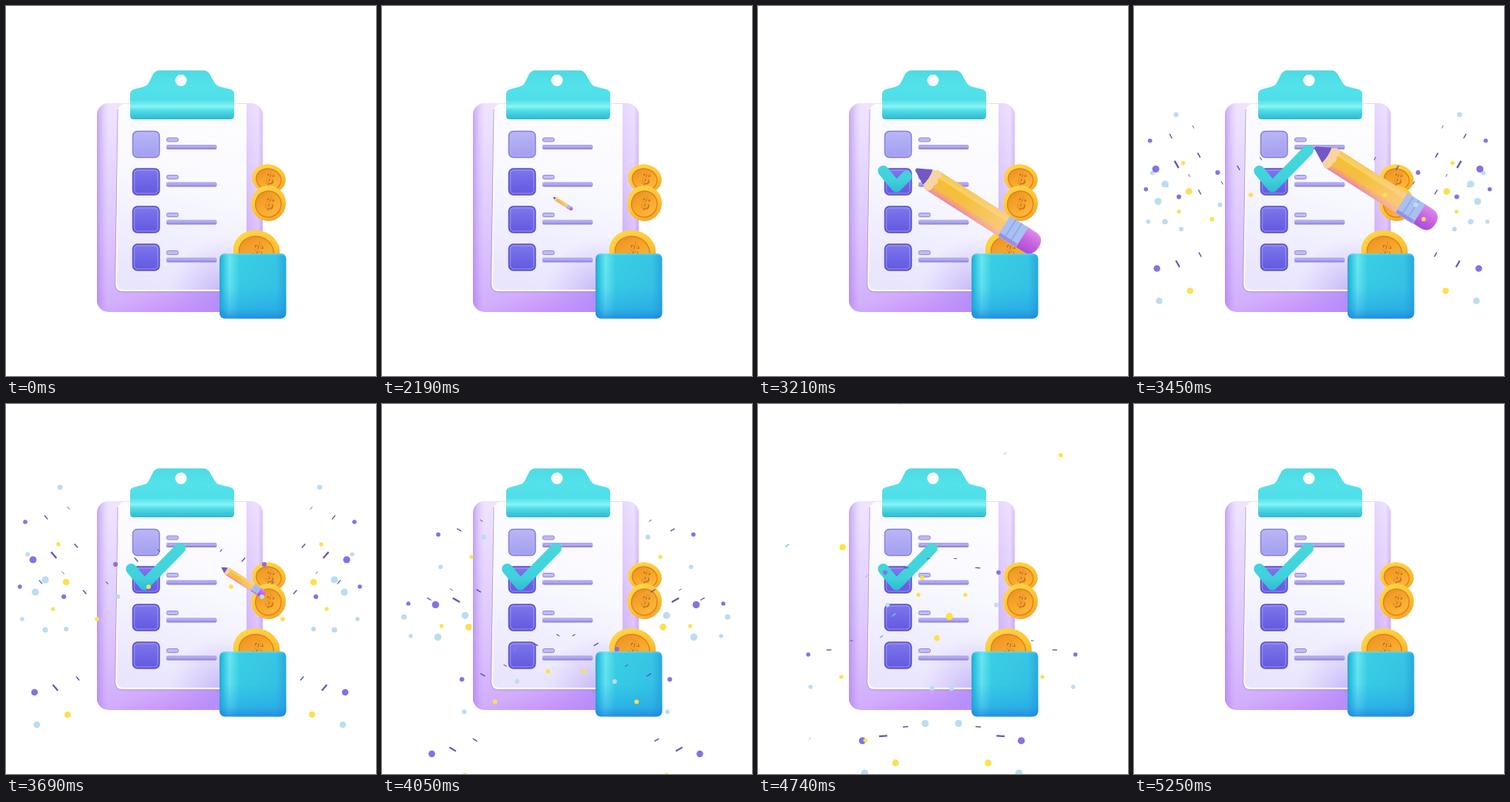
Write an HTML page with a canvas that moves like this. It is 480 px wide and 480 px high and loops after 7.17 s.

```html
<!DOCTYPE html>
<html lang="en">
<head>
<meta charset="utf-8">
<title>Checklist</title>
<style>
html, body { margin: 0; width: 100%; height: 100%; overflow: hidden; background: #fff; }
svg, canvas { position: absolute; left: 0; top: 0; width: 480px; height: 480px; }
text { font-family: "Liberation Sans", Arial, sans-serif; font-weight: bold; text-anchor: middle; }
</style>
</head>
<body>
<svg viewBox="0 0 480 480">
  <defs>
    <linearGradient id="board" x1=".35" y1="0" x2=".6" y2="1">
      <stop offset="0" stop-color="#ecdffd"/><stop offset=".45" stop-color="#dcc6fc"/><stop offset=".85" stop-color="#cda6fb"/><stop offset="1" stop-color="#bf86fa"/>
    </linearGradient>
    <linearGradient id="rim">
      <stop offset="0" stop-color="#a878f0" stop-opacity=".6"/><stop offset=".03" stop-color="#b58cf4" stop-opacity=".3"/><stop offset=".08" stop-color="#fff" stop-opacity=".1"/><stop offset=".9" stop-color="#fff" stop-opacity="0"/><stop offset=".97" stop-color="#fff" stop-opacity=".25"/><stop offset="1" stop-color="#b58cf4" stop-opacity=".3"/>
    </linearGradient>
    <linearGradient id="paper" x1=".6" y1="0" x2=".4" y2="1">
      <stop offset="0" stop-color="#fefeff"/><stop offset=".45" stop-color="#f8f8ff"/><stop offset="1" stop-color="#e8e5fd"/>
    </linearGradient>
    <radialGradient id="corner" gradientUnits="userSpaceOnUse" cx="285" cy="375" r="75">
      <stop offset="0" stop-color="#a98cf4" stop-opacity=".6"/><stop offset="1" stop-color="#b9a4f8" stop-opacity="0"/>
    </radialGradient>
    <linearGradient id="clip" x1="0" y1="0" x2="0" y2="1">
      <stop offset="0" stop-color="#4fd9e3"/><stop offset=".3" stop-color="#52e2ea"/><stop offset=".6" stop-color="#50dfe8"/><stop offset=".74" stop-color="#86f3f3"/><stop offset=".82" stop-color="#50dde6"/><stop offset="1" stop-color="#2fb8d0"/>
    </linearGradient>
    <linearGradient id="pocket">
      <stop offset="0" stop-color="#22a8d4"/><stop offset=".06" stop-color="#34c8e0"/><stop offset=".15" stop-color="#68e6f0"/><stop offset=".3" stop-color="#38cfe4"/><stop offset=".85" stop-color="#37c5e4"/><stop offset="1" stop-color="#2ba6dc"/>
    </linearGradient>
    <linearGradient id="shade" x1="0" y1="0" x2="0" y2="1">
      <stop offset="0" stop-color="#9ff" stop-opacity=".4"/><stop offset=".06" stop-color="#1c9ae8" stop-opacity="0"/><stop offset=".5" stop-color="#1c9ae8" stop-opacity=".08"/><stop offset=".85" stop-color="#1c92e4" stop-opacity=".45"/><stop offset="1" stop-color="#1c78dc" stop-opacity=".75"/>
    </linearGradient>
    <linearGradient id="coin" x1="0" y1="0" x2="1" y2="1">
      <stop offset="0" stop-color="#ffdc50"/><stop offset=".55" stop-color="#ffc233"/><stop offset="1" stop-color="#f09a28"/>
    </linearGradient>
    <linearGradient id="dish" x1="0" y1="0" x2="1" y2="1">
      <stop offset="0" stop-color="#e98d1e"/><stop offset=".5" stop-color="#f7a82c"/><stop offset="1" stop-color="#ffbe3e"/>
    </linearGradient>
    <linearGradient id="box" x1="0" y1="0" x2="0" y2="1">
      <stop offset="0" stop-color="#7f78ea"/><stop offset=".5" stop-color="#6f67e6"/><stop offset="1" stop-color="#6259df"/>
    </linearGradient>
    <linearGradient id="palebox" x1="0" y1="0" x2="0" y2="1">
      <stop offset="0" stop-color="#b9b6f5"/><stop offset="1" stop-color="#a29ef0"/>
    </linearGradient>
    <linearGradient id="bar" x1="0" y1="0" x2="0" y2="1">
      <stop offset="0" stop-color="#a9a1ea"/><stop offset=".4" stop-color="#b6aff0"/><stop offset="1" stop-color="#8579d8"/>
    </linearGradient>
    <linearGradient id="wood" x1="0" y1="0" x2="0" y2="1">
      <stop offset="0" stop-color="#f6c65a"/><stop offset=".25" stop-color="#fad266"/><stop offset=".3" stop-color="#f5c032"/><stop offset=".7" stop-color="#f6bc48"/><stop offset=".85" stop-color="#f3a070"/><stop offset="1" stop-color="#e883bd"/>
    </linearGradient>
    <linearGradient id="pale"><stop offset=".3" stop-color="#fbd9a8" stop-opacity="0"/><stop offset="1" stop-color="#fbd0a0" stop-opacity=".6"/></linearGradient>
    <linearGradient id="rubber" x1="0" y1="0" x2="0" y2="1">
      <stop offset="0" stop-color="#dc8cec"/><stop offset=".5" stop-color="#c862e0"/><stop offset="1" stop-color="#a94bdc"/>
    </linearGradient>
    <linearGradient id="tick" gradientUnits="userSpaceOnUse" x1="0" y1="180" x2="0" y2="244">
      <stop offset="0" stop-color="#48d8dc"/><stop offset=".7" stop-color="#40d2dc"/><stop offset="1" stop-color="#2fb6ce"/>
    </linearGradient>
  </defs>

  <rect x="118" y="126" width="215" height="271" rx="15" fill="url(#board)"/>
  <rect x="118" y="126" width="215" height="271" rx="15" fill="url(#rim)"/>
  <path id="sheet" d="M154 127H312V370H151Q142 370 142.500 360L146 134Q147 127 154 127Z" fill="url(#paper)"/>
  <rect x="205" y="300" width="107" height="97" fill="url(#corner)"/>
  <path d="M146.500 132L143 360Q143 369 152 369H277" fill="none" stroke="#fff" stroke-width="2"/>
  <path d="M145 134L141.500 361Q142 371 152 371H277" fill="none" stroke="#ab86ea" stroke-opacity=".7"/>
  <path d="M199 83.500H256Q261 83.500 264 88L271 100Q273 103.500 277 104.500L291 108Q296 109.500 296 114V142Q296 147 291 147H166Q161 147 161 142V114Q161 109.500 166 108L179 104.500Q183 103.500 185 100L191 88Q194 83.500 199 83.500Z" fill="url(#clip)"/>
  <circle cx="227" cy="96.500" r="7.500" fill="#fff"/>
  <g id="rows"></g>
  <g id="coins"></g>
  <rect x="277" y="321" width="86.500" height="84.500" rx="7" fill="url(#pocket)"/>
  <rect x="277" y="321" width="86.500" height="84.500" rx="7" fill="url(#shade)"/>

  <path id="check" d="M162.500 214L179.500 234.500L226 187" pathLength="1" fill="none" stroke="url(#tick)" stroke-width="14" stroke-linecap="round" stroke-linejoin="round"/>
  <g id="pencil">
    <path d="M0 0L24 -14.500H137V15.500H24Z" fill="url(#wood)"/>
    <path d="M40 -14.500H137V15.500H40Z" fill="url(#pale)"/>
    <path d="M2 -1L24 -14.500H29Q34 -10 30 -5Q35 0 30 5Q33 10 27 15.500H24L2 1Z" fill="#f8d3a4"/>
    <path d="M-1 0Q-1 -2 2 -3L18 -11.500Q21 0 18 12L2 3Q-1 2 -1 0Z" fill="#7258c6"/>
    <path d="M160 -15H174Q188 -15 188 0T174 15H160Z" fill="url(#rubber)"/>
    <rect x="135" y="-15" width="28" height="31" rx="2" fill="#a9c0f0"/>
    <path d="M144 -15V16M153 -15V16" stroke="#8da6e6" stroke-width="1.500"/>
    <path d="M136 13H162" stroke="#9a90e4" stroke-width="5"/>
  </g>
</svg>
<canvas width="480" height="480"></canvas>
<script>
const $ = s => document.querySelector(s);
const ctx = $('canvas').getContext('2d');
const check = $('#check'), pencil = $('#pencil');
const clamp = v => Math.max(0, Math.min(1, v));
const mix = (a, b, u) => a + (b - a) * u;

$('#rows').innerHTML = [0, 48.5, 97.5, 146.5].map((y, i) => `<g transform="translate(0 ${y})">
  <rect x="164.500" y="162.500" width="34.500" height="34" rx="6" fill="url(#${i ? 'box' : 'palebox'})" stroke="${i ? '#5b52c6' : '#8581d6'}" stroke-width="1.500"/>
  <rect x="166.500" y="164.500" width="30.500" height="30" rx="4.500" fill="none" stroke="#b9b4ff" stroke-opacity=".4" stroke-width="1.500"/>
  <rect x="208.500" y="171" width="15" height="5" rx="2" fill="#c0baf2" stroke="#9389dc"/>
  <rect x="208" y="180" width="65.500" height="6" rx="2" fill="url(#bar)"/></g>`).join('');

$('#coins').innerHTML = [[341, 224, 22, 18.5, 22], [340.5, 256, 22.5, 23, 23], [325, 318, 30.5, 27, 28]]
  .map(([x, y, rx, ry, size]) => `<g transform="translate(${x} ${y}) rotate(14)">
  <ellipse rx="${rx}" ry="${ry}" fill="url(#coin)"/>
  <ellipse cy="1" rx="${rx * .74}" ry="${ry * .74}" fill="url(#dish)" stroke="#dd8420" stroke-width="1.500"/>
  <text x="1" y="${size * .33}" font-size="${size}" fill="#c4701c">$</text>
  <text x="-.5" y="${size * .33 - 1}" font-size="${size}" fill="#f3a030">$</text></g>`).join('');

// x, y at the end of the burst; x, y 690 ms later; dot radius
const clusters = [
  [25, 153, 117, 191, 2.8], [35, 202, 101, 338, 4.6], [18, 237, 49, 288, 2.7],
  [75, 250, 130, 500, 3], [37, 374, 90, 560, 4.3], [142, 208, 200, 464, 3]];
const singles = [[70, 108, 189, 259, 3.2], [51, 228, 160, 336, 4.6], [51, 293, 8, 254, 3.6]];
// x, y, radius of the central burst after 240 ms
const sparks = [
  [202, 22, 3.5], [343, 69, 2.7], [151, 150, 4], [221, 177, 2.7], [245, 211, 4.6],
  [234, 230, 3.6], [171, 320, 2.6], [272, 384, 4.3], [364, 428, 4.8]];

function dot(x, y, r, color) {
  ctx.fillStyle = color;
  ctx.beginPath();
  ctx.arc(x, y, r, 0, 7);
  ctx.fill();
}

function dash(x, y, len, angle, color, width) {
  const dx = Math.cos(angle) * len / 2, dy = Math.sin(angle) * len / 2;
  ctx.strokeStyle = color;
  ctx.lineWidth = width;
  ctx.beginPath();
  ctx.moveTo(x - dx, y - dy);
  ctx.lineTo(x + dx, y + dy);
  ctx.stroke();
}

function place([x0, y0, x1, y1], ms) {
  if (ms < 3690) {
    const u = 1 - (1 - (ms - 3210) / 480) ** 2;
    return [mix(8, x0, u), mix(240, y0, u)];
  }
  const u = (ms - 3690) / 690;
  return [mix(x0, x1, u), mix(y0, y1, u ** 1.3)];
}

function sideBurst(ms, fade) {
  const angle = mix(.85, .25, (ms - 3690) / 690);
  for (const c of clusters) {
    const [x, y] = place(c, ms), r = c[4] * fade;
    dot(x, y, r, '#8870e5');
    dot(x + 43, y + 29, r * .95, '#fbe150');
    dot(x + 3, y + 42, r, '#bcdcf0');
    dash(x + 27, y - 6, r * 2.3, angle, '#6257b5', r * .5);
    dash(x + 56, y - 18, r * 1.5, angle, '#6257b5', r * .35);
  }
  for (const s of singles) {
    const [x, y] = place(s, ms);
    dot(x, y, s[4] * fade, '#bcdcf0');
  }
}

function centreBurst(ms, fade) {
  const s = (ms - 4140) / 1000;
  const q = (1 - Math.exp(-4 * s)) / (1 - Math.exp(-.96));
  const drop = 220 * (s * s - .0576 * Math.min(1, s / .24));
  for (const [px, py, r] of sparks) {
    const x = mix(238, px, q), y = mix(215, py, q) + drop;
    dot(x, y, r * fade, '#fde43c');
    dash(x - 72, y - 2, r * 1.4 * fade, -.7, '#62bfd4', r * .35);
  }
}

function drawPencil(ms) {
  const grow = 1 - (1 - clamp((ms - 2160) / 360)) ** 2;
  const shrink = 1 - clamp((ms - 3400) / 360) ** 2;
  const scale = ms < 2190 ? 0 : grow * shrink;
  const f = clamp((ms - 2730) / 690) ** 1.6;
  const p = check.getPointAtLength(f * check.getTotalLength());
  const angle = 32.5 * Math.PI / 180;
  const x = p.x + 8 * Math.min(1, 2 * f) + 84 * Math.cos(angle);
  const y = p.y - 4 + 84 * Math.sin(angle);
  pencil.style.display = scale > .01 ? '' : 'none';
  pencil.setAttribute('transform', `translate(${x} ${y}) rotate(32.5) scale(${scale}) translate(-84 0)`);

  const drawn = f < 1 ? Math.max(0, f - .07) : 1;
  check.style.display = drawn > 0 ? '' : 'none';
  check.setAttribute('stroke-dasharray', `${drawn} 2`);
}

function frame(now) {
  const ms = Math.floor((now - start) % 7170 / 30) * 30;
  drawPencil(ms);
  ctx.clearRect(0, 0, 480, 480);
  if (ms > 3210 && ms < 5250) {
    const fade = clamp((5280 - ms) / 400);
    for (const side of [1, -1]) {
      ctx.setTransform(side, 0, 0, 1, side < 0 ? 477 : 0, 0);
      sideBurst(ms, fade);
    }
    ctx.setTransform(1, 0, 0, 1, 0, 0);
    if (ms > 4140) centreBurst(ms, fade);
  }
  requestAnimationFrame(frame);
}
const start = performance.now();
frame(start);
</script>
</body>
</html>
```
